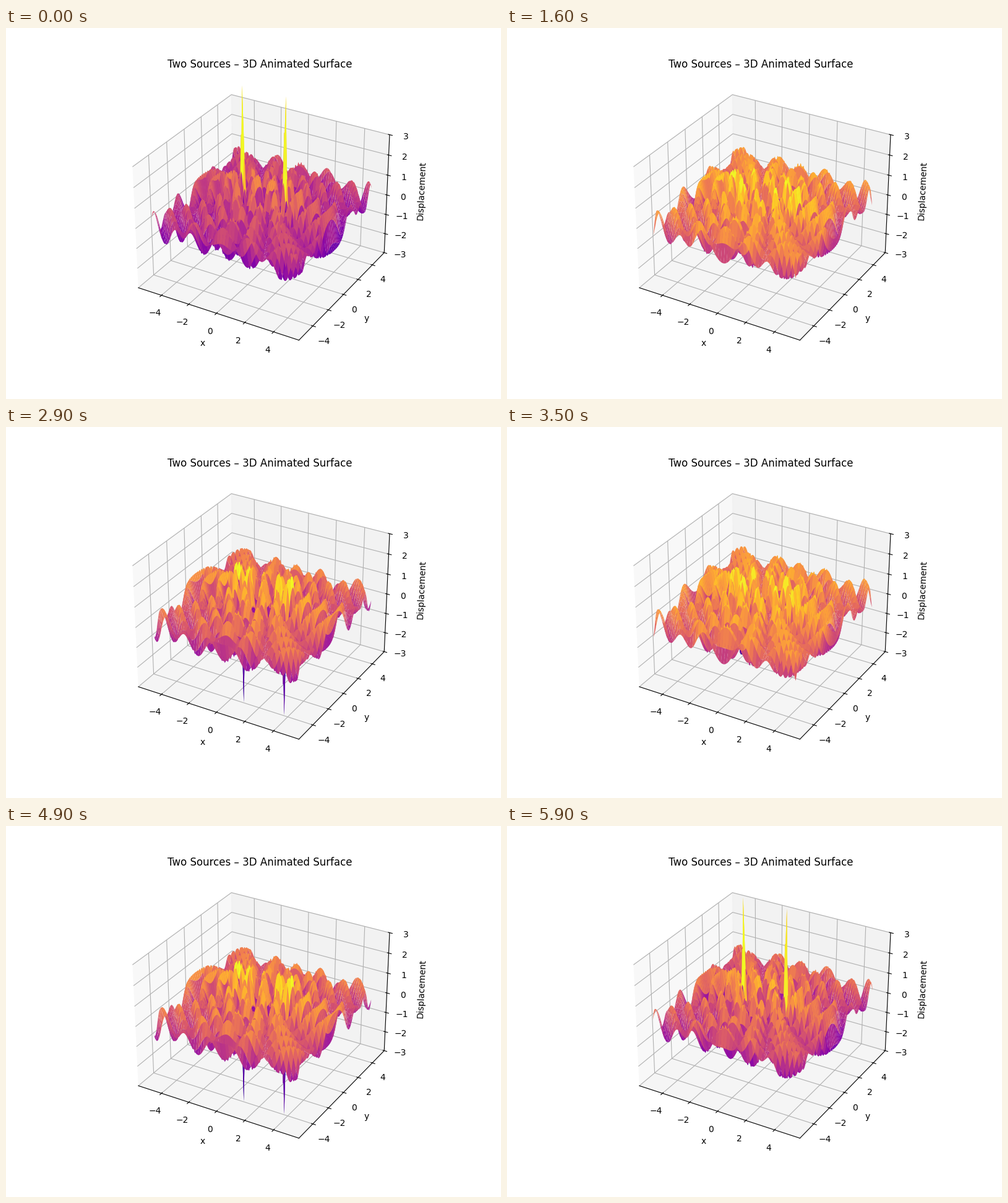
Write a matplotlib script that moves like this. It is 800x600 px and loops after 6000 ms.

```python
import numpy as np
import matplotlib.pyplot as plt
from matplotlib.animation import FuncAnimation

FRAMES = 60
INTERVAL = 100
CYCLE = 20          # frames per wave period
WAVE_NUMBER = 2 * np.pi
SOURCES = [(-1.5, 0.0), (1.5, 0.0)]
HALF_WIDTH = 5
PADDING = 1.1 * 25 / 24   # data margin, then view margin

axis = np.linspace(-HALF_WIDTH, HALF_WIDTH, 150)
X, Y = np.meshgrid(axis, axis)
DISTANCES = [np.hypot(X - sx, Y - sy) for sx, sy in SOURCES]


def displacement(step):
    """Sum of circular waves, each fading with the root of its radius."""
    phase = 2 * np.pi * step / CYCLE
    return sum(np.cos(WAVE_NUMBER * r - phase) / np.sqrt(r)
               for r in DISTANCES)


fig = plt.figure(figsize=(8, 6), dpi=100)
ax = fig.add_subplot(projection="3d")

# The motion is periodic, so one surface per step of the cycle is enough.
surfaces = [ax.plot_surface(X, Y, displacement(step), cmap="plasma")
            for step in range(CYCLE)]

limit = HALF_WIDTH * PADDING
ax.set_xlim(-limit, limit)
ax.set_ylim(-limit, limit)
ax.set_zlim(-3, 3)
ax.set_xlabel("x")
ax.set_ylabel("y")
ax.set_zlabel("Displacement")
ax.set_title("Two Sources – 3D Animated Surface")


def update(frame):
    for step, surface in enumerate(surfaces):
        surface.set_visible(step == frame % CYCLE)
    return surfaces


anim = FuncAnimation(fig, update, frames=FRAMES, interval=INTERVAL,
                     init_func=lambda: update(0), blit=False, repeat=True)
plt.show()
```
